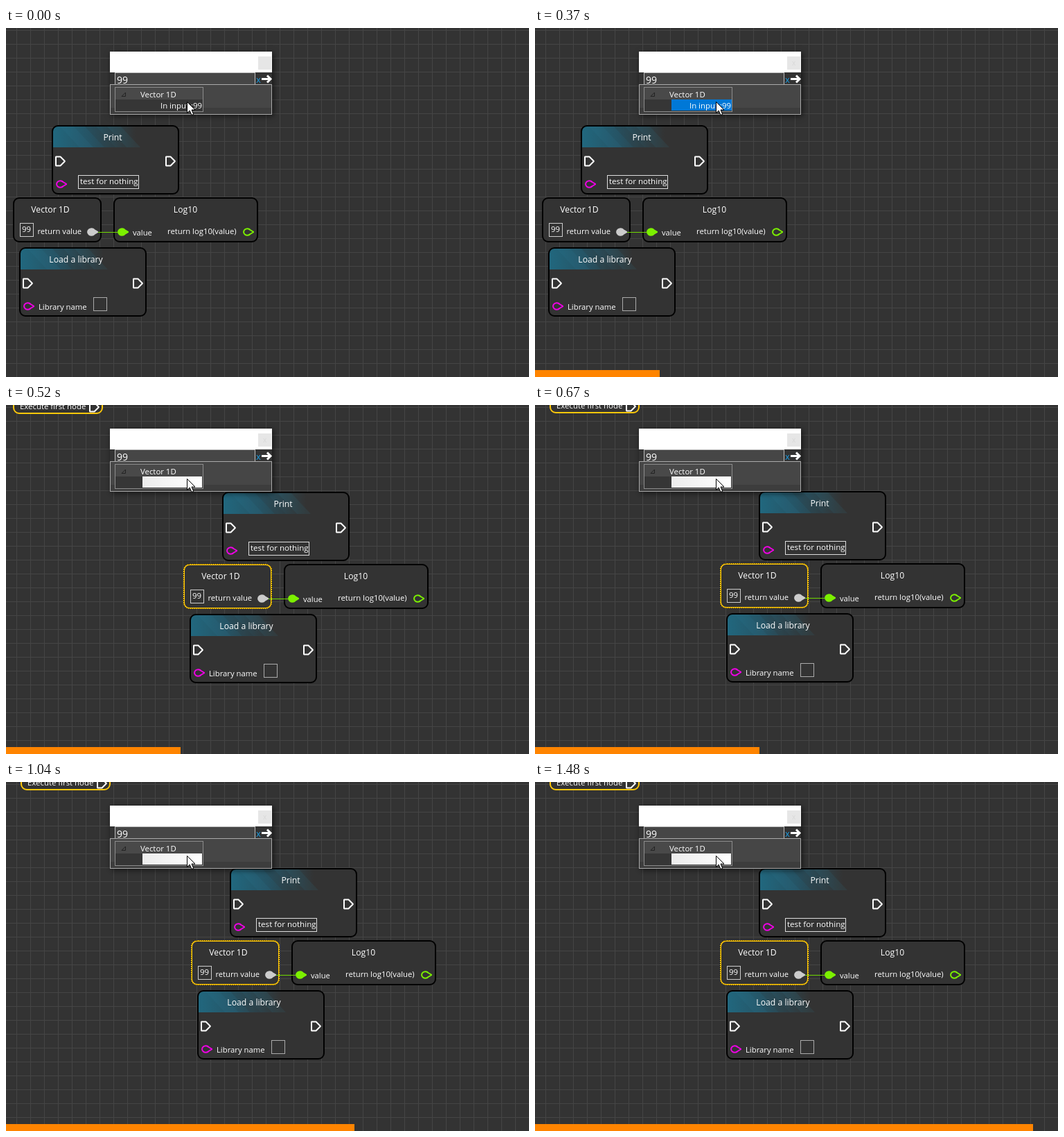
Animation, 755 px wide and 503 px high, one loop 1560 ms. Source, as an HTML page with a canvas:

```html
<!DOCTYPE html>
<html lang="en">
<head>
<meta charset="utf-8">
<title>Node editor</title>
<style>
html, body { margin: 0; width: 100%; height: 100%; overflow: hidden; background: #333; }
canvas { display: block; }
</style>
</head>
<body>
<canvas id="stage" width="755" height="503"></canvas>
<script>
const ctx = document.getElementById('stage').getContext('2d');
const W = 755, H = 503, LOOP = 1560;
const STEPS = [0, 140, 180, 220, 300, 370, 440, 520, 600, 670, 740,
  820, 890, 970, 1040, 1100, 1180, 1260, 1330, 1400, 1480];
const GOLD = '#ffc80a', GREEN = '#7cf000', MAGENTA = '#f000e6';

function fill(x, y, w, h, color) {
  ctx.fillStyle = color;
  ctx.fillRect(x, y, w, h);
}

function frame(x, y, w, h, color) {
  ctx.strokeStyle = color;
  ctx.lineWidth = 1;
  ctx.strokeRect(x + .5, y + .5, w - 1, h - 1);
}

function text(str, x, y, size = 11.4, align = 'left', color = '#fff', weight = 400) {
  ctx.font = `${weight} ${size}px "Open Sans", "Noto Sans", sans-serif`;
  ctx.textAlign = align;
  ctx.fillStyle = color;
  ctx.fillText(str, x, y);
}

function title(str, x, y) {
  text(str, x, y, 12.2, 'center', '#fff', 500);
}

function shape(d, x, y, color, filled) {
  ctx.save();
  ctx.translate(x, y);
  const path = new Path2D(d);
  ctx.strokeStyle = ctx.fillStyle = color;
  ctx.lineWidth = 2;
  ctx.lineJoin = 'bevel';
  if (filled) ctx.fill(path);
  ctx.stroke(path);
  ctx.restore();
}

const execPin = (x, y) => shape('M1-6.5H7.5L14 0 7.5 6.5H1Z', x, y, '#fff');
const dataPin = (x, y, color, filled) =>
  shape('M15.5 0L10.5-3A5.3 4.8 0 1 0 10.5 3Z', x, y, color, filled);

function header(x, y, w) {
  const fade = ctx.createLinearGradient(x, 0, x + w * .66, 0);
  fade.addColorStop(0, '#21687f');
  fade.addColorStop(.45, '#265465');
  fade.addColorStop(1, '#333333');
  fill(x, y, w, 32, fade);
  // slanted bands over the fade
  for (const [left, width, color] of [[10, 20, '#2a7c9524'], [46, 16, '#3333332c'], [78, 20, '#2a7c951e']]) {
    ctx.fillStyle = color;
    ctx.beginPath();
    ctx.moveTo(x + left, y);
    ctx.lineTo(x + left + 30, y + 32);
    ctx.lineTo(x + left + width + 30, y + 32);
    ctx.lineTo(x + left + width, y);
    ctx.fill();
  }
}

function card(x, y, w, h, { color = '#000', banner = false, dotted = false } = {}) {
  const outline = new Path2D();
  outline.roundRect(x + 1, y + 1, w - 2, h - 2, 8);
  ctx.fillStyle = '#333';
  ctx.fill(outline);
  if (banner) {
    ctx.save();
    ctx.clip(outline);
    header(x, y, w);
    ctx.restore();
  }
  ctx.strokeStyle = color;
  ctx.lineWidth = 2;
  ctx.stroke(outline);
  if (dotted) {
    ctx.beginPath();
    ctx.roundRect(x + .5, y + .5, w - 1, h - 1, 8);
    ctx.setLineDash([1, 2]);
    ctx.strokeStyle = '#000';
    ctx.lineWidth = 1;
    ctx.stroke();
    ctx.setLineDash([]);
  }
}

function drawGrid() {
  fill(0, 0, W, H, '#333');
  for (let x = 15; x < W; x += 20) fill(x, 0, 1, H, '#454545');
  for (let y = 3; y < H; y += 20) fill(0, y, W, 1, '#454545');
}

function drawNodes(dx, dy, selected) {
  ctx.save();
  ctx.translate(dx, dy);

  card(-236, -37, 130, 65, { color: GOLD });
  text('Execute first node', -226, 21);
  execPin(-126, 18);

  card(66, 140, 184, 100, { banner: true });
  title('Print', 154, 162);
  execPin(71, 192);
  execPin(230, 192);
  dataPin(72, 225, MAGENTA);
  frame(104, 212, 88, 20, '#ddd');
  text('test for nothing', 107, 225, 11.6);

  card(10, 244, 128, 65, selected ? { color: GOLD, dotted: true } : {});
  title('Vector 1D', 64, 266);
  frame(20, 281, 20, 20, '#ccc');
  text('99', 23, 294);
  text('return value', 45.5, 297, 11.2);

  card(155, 244, 209, 65);
  title('Log10', 259, 266);
  text('value', 183, 298.5, 11.2);
  text('return log10(value)', 233, 297, 11.3);
  fill(132, 294, 29, 1, '#70d800');
  dataPin(117, 294, '#ccc', true);
  dataPin(161, 294, GREEN, true);
  dataPin(342, 294, GREEN);

  card(19, 316, 184, 100, { banner: true });
  title('Load a library', 101, 338);
  execPin(24, 368);
  execPin(183, 368);
  dataPin(25, 401, MAGENTA);
  text('Library name', 47, 406, 11.3);
  frame(126, 388, 20, 20, '#aaa');

  ctx.restore();
}

function drawPopup({ active, row, cross }) {
  ctx.save();
  ctx.shadowColor = '#0009';
  ctx.shadowBlur = 8;
  ctx.shadowOffsetX = ctx.shadowOffsetY = 2;
  fill(150, 34, 234, 91, '#333');
  ctx.restore();

  fill(150, active ? 33 : 34, 234, active ? 31 : 30, active ? '#777' : '#fff');
  fill(364, 41, 19, 19, active ? '#c75050' : '#e6e6e6');
  if (cross) text('x', 373.5, 54, 10, 'center', active ? '#fff' : '#d8d8d8');

  fill(157, 64, 203, 18, '#464646');
  frame(157, 64, 203, 18, '#bbb');
  text('99', 160, 80, 14);
  text('x', 361, 78.5, 13, 'left', '#1a9be0');
  ctx.strokeStyle = '#fff';
  ctx.lineWidth = 3;
  ctx.stroke(new Path2D('M369 73.5H382M377 68.5L382 73.5 377 78.5'));

  fill(150, 81, 234, 44, '#464646');
  fill(151, 115, 232, 9, '#3d3d3d');
  frame(150, 81, 234, 44, '#aaa');
  fill(158, 86, 126, 17, '#494949');
  fill(158, 103, 126, 17, '#363636');
  frame(157, 85, 128, 36, '#8c8c8c');
  ctx.strokeStyle = '#222';
  ctx.lineWidth = 1;
  ctx.stroke(new Path2D('M172.5 93V98.5H167Z'));
  text('Vector 1D', 194, 100, 11.4);

  if (row === 'pressed') {
    const sheen = ctx.createLinearGradient(197, 0, 284, 0);
    sheen.addColorStop(0, '#ececec');
    sheen.addColorStop(1, '#fff');
    fill(197, 103, 86, 16, sheen);
  } else {
    if (row === 'hover') fill(197, 103, 87, 16, '#0078d7');
    text('In input :99', 283, 116, 11.4, 'right');
  }
}

function drawCursor() {
  const arrow = new Path2D('M261.5 106.5V122.5L265.2 119 268 125.5 270.7 124.3 268 118H273Z');
  ctx.fillStyle = '#fff';
  ctx.fill(arrow);
  ctx.strokeStyle = '#000';
  ctx.lineWidth = 1;
  ctx.stroke(arrow);
}

// The view springs past its resting place, back, then settles.
function pan(step) {
  if (step < 6) return [0, 0];
  if (step === 6) return [345, -21];
  return step < 9 ? [246, -15] : [257, -16];
}

function draw(now) {
  const time = now % LOOP;
  const step = STEPS.findLastIndex(start => start <= time);
  const moved = step >= 6;
  drawGrid();
  drawNodes(...pan(step), moved);
  drawPopup({
    active: step > 0 && step < 5,
    cross: step > 0,
    row: moved ? 'pressed' : step > 0 ? 'hover' : 'idle'
  });
  drawCursor();
  fill(0, 493, Math.round(W * step / STEPS.length), 10, '#ff8400');
}

const origin = performance.now();
function tick() {
  draw(performance.now() - origin);
  requestAnimationFrame(tick);
}
tick();
</script>
</body>
</html>
```
